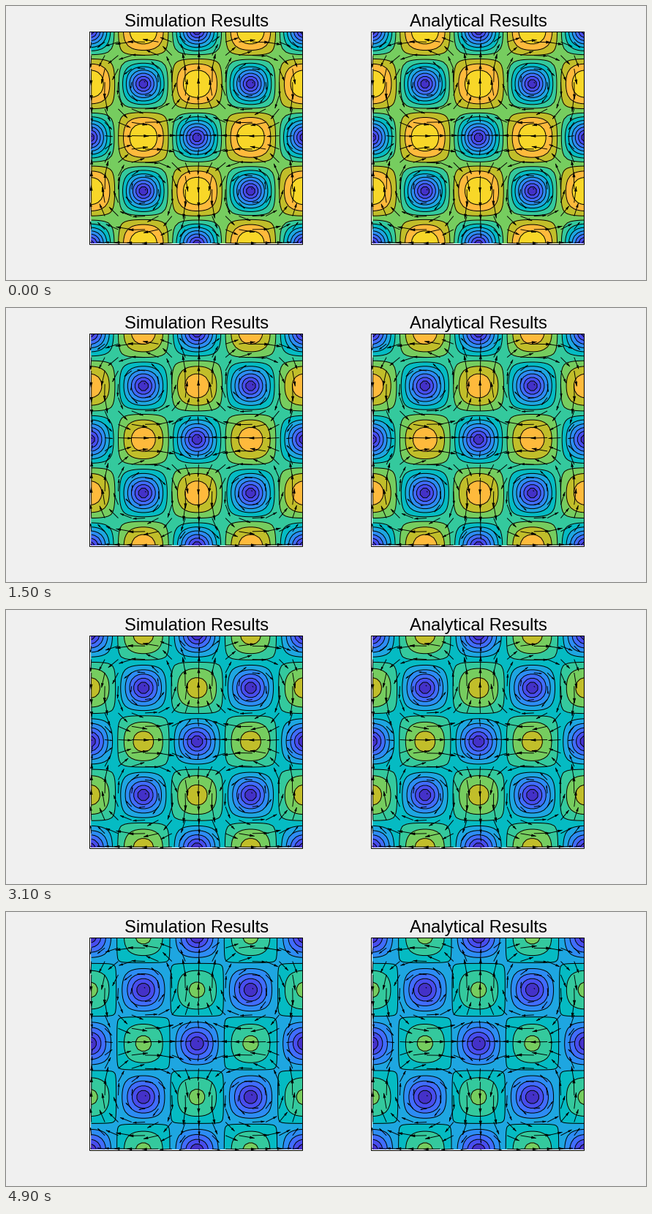
Write a matplotlib script that moves like this. It is 875 px wide and 375 px high and loops after 5 s.

```python
import numpy as np
import matplotlib.pyplot as plt
from matplotlib.animation import FuncAnimation
from matplotlib.collections import LineCollection, PolyCollection
from matplotlib.patches import Rectangle

W, H, DPI = 875, 375, 100
FRAMES, INTERVAL = 50, 100
PX = 72 / DPI                      # points per pixel

NODES, STRIDE = 64, 4
SIDE = 291
CELL = SIDE / (NODES - 0.5)        # the box ends on the last node
ARROW = 25                         # pixels at full speed
START_SPEED, DECAY = 11.42, 0.0802  # in contour steps, per second

LEVELS = np.arange(1.5, 11)
COLORS = ["#4431c8", "#484dee", "#416cff", "#2d8cf4", "#1ea6e1", "#05bbc3",
          "#34c99d", "#76cd5f", "#c1be2a", "#feba3c", "#f8d728"]
PANELS = [(114.5, "Simulation Results"), (499.5, "Analytical Results")]
TOP, BOTTOM = 35.5, 35.5 + SIDE

# Vortex array on cell centres, y pointing up
offset = np.arange(NODES) + 0.5
phase = offset * 2 * np.pi / NODES
px, py = np.meshgrid(phase, phase)
u = -np.sin(px) * np.cos(py)
v = np.cos(px) * np.sin(py)
speed = np.hypot(u, v)
local = offset * CELL

fig = plt.figure(figsize=(W / DPI, H / DPI), dpi=DPI, facecolor="#f0f0f0")
ax = fig.add_axes([0, 0, 1, 1])
ax.set_axis_off()


def draw_arrows(left):
    step = slice(None, None, STRIDE)
    x, y = np.meshgrid(left + local[step], BOTTOM - local[step])
    tail = np.stack([x.ravel(), y.ravel()], axis=1)
    move = ARROW * np.stack([u[step, step].ravel(), -v[step, step].ravel()], axis=1)
    length = np.hypot(*move.T)[:, None]
    along = move / length
    across = along[:, ::-1] * [-1, 1]
    head = np.minimum(0.3 * length, 7)
    tip = tail + move
    base = tip - along * head
    side = across * head * 0.3
    ax.add_collection(LineCollection(np.stack([tail, tip], axis=1),
                                     colors="k", linewidths=0.95 * PX, zorder=4))
    ax.add_collection(PolyCollection(np.stack([tip, base + side, base - side], axis=1),
                                     facecolors="k", edgecolors="none", zorder=4))


for left, title in PANELS:
    ax.add_patch(Rectangle((left, TOP), SIDE, SIDE, fc="white", ec="none",
                           zorder=0, snap=False))
    ax.add_patch(Rectangle((left, TOP), SIDE, SIDE, fc="none", ec="k", lw=PX,
                           zorder=5, snap=False))
    ax.text(left + SIDE / 2 + 0.8, 28, title, ha="center", va="baseline",
            family="Liberation Sans", size=23.8 * PX, color="k")
    draw_arrows(left)

ax.set_xlim(0, W)
ax.set_ylim(H, 0)
contours = []


def update(frame):
    for item in contours:
        item.remove()
    contours.clear()
    t = frame * INTERVAL / 1000
    field = START_SPEED * np.exp(-DECAY * t) * speed
    for left, _ in PANELS:
        x, y = left + local, BOTTOM - local
        contours.append(ax.contourf(x, y, field, levels=[0, *LEVELS, 12],
                                    colors=COLORS, zorder=1))
        contours.append(ax.contour(x, y, field, levels=LEVELS, colors="k",
                                   linewidths=PX, zorder=2))
    ax.set_xlim(0, W)
    ax.set_ylim(H, 0)
    return []


anim = FuncAnimation(fig, update, frames=FRAMES, interval=INTERVAL,
                     init_func=lambda: [], repeat=True, repeat_delay=0)
plt.show()
```
